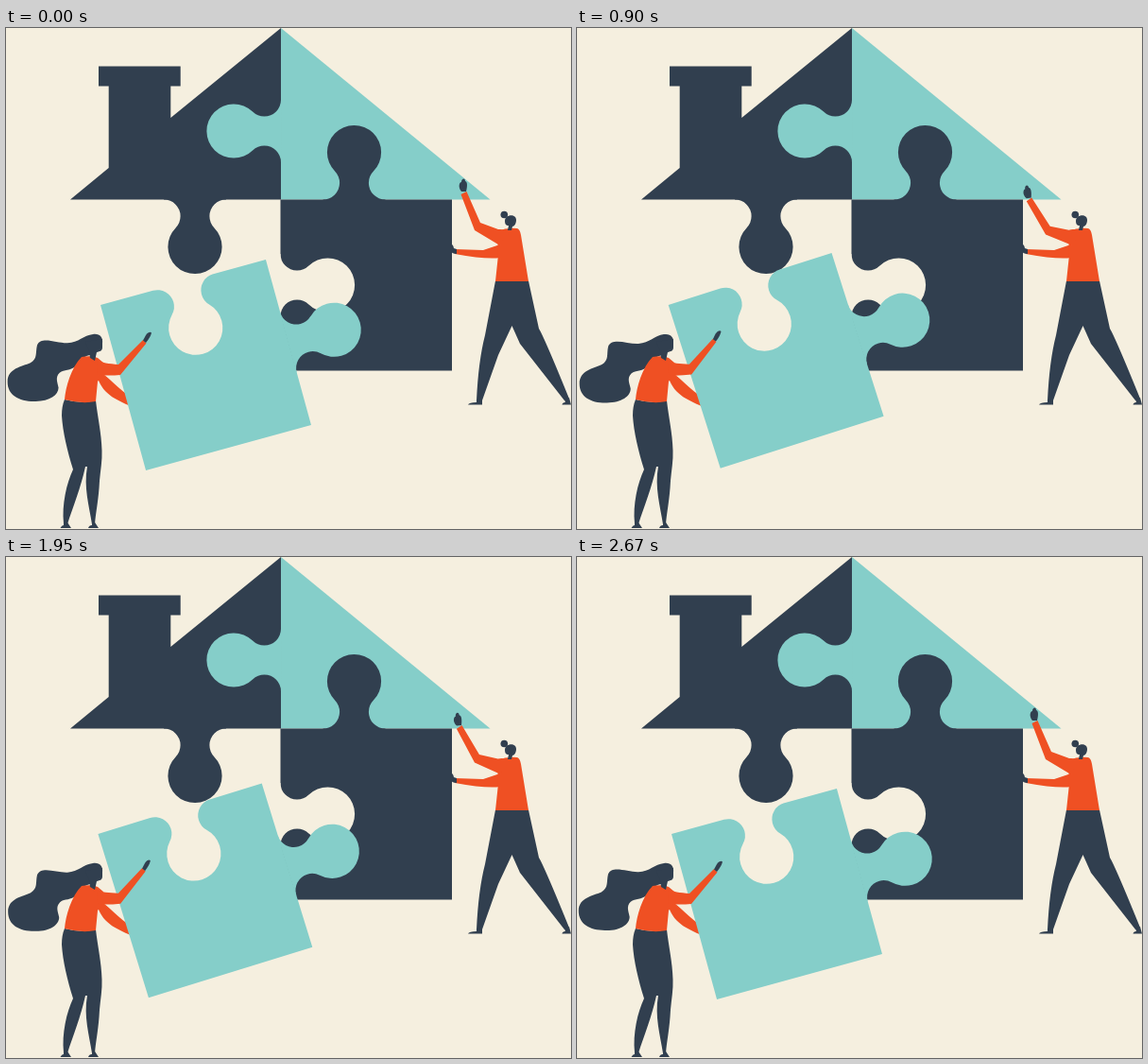
An HTML page with a canvas that plays this animation: 598 px wide and 530 px high, repeating every 2700 ms.

```html
<!DOCTYPE html>
<html lang="en">
<head>
<meta charset="utf-8">
<title>Puzzle house</title>
<style>
html, body { margin: 0; width: 100%; height: 100%; overflow: hidden; background: #f5efdf; }
canvas { display: block; }
</style>
</head>
<body>
<canvas id="stage" width="598" height="530"></canvas>
<script>
const ctx = document.getElementById('stage').getContext('2d');
const CREAM = '#f5efdf', NAVY = '#313f4f', TEAL = '#85cec9', ORANGE = '#ef5023';
const LOOP = 2700, STEP = 30, TAU = Math.PI * 2;

// Jigsaw tab sitting on the local x axis and pointing towards +y.
const KNOB = 50, KNOB_R = 28.6, NECK_X = 33, NECK_R = 17.6;

function addTab(path, base) {
  const a = Math.atan2(KNOB - NECK_R, NECK_X);
  path.moveTo(-NECK_X, base);
  path.lineTo(-NECK_X, 0);
  path.arc(-NECK_X, NECK_R, NECK_R, -Math.PI / 2, a);
  path.arc(0, KNOB, KNOB_R, Math.PI + a, -a, true);
  path.arc(NECK_X, NECK_R, NECK_R, Math.PI - a, Math.PI * 1.5);
  path.lineTo(NECK_X, base);
  return path;
}

// The base reaches slightly into the neighbouring shape to hide the seam.
const tabPath = addTab(new Path2D(), -0.6);

function tab(x, y, turn, color) {
  ctx.save();
  ctx.translate(x, y);
  ctx.rotate(turn * Math.PI / 2);
  ctx.fillStyle = color;
  ctx.fill(tabPath);
  ctx.restore();
}

function fill(path, color) {
  ctx.fillStyle = color;
  ctx.fill(path);
}

function dot(x, y, r, color) {
  ctx.beginPath();
  ctx.arc(x, y, r, 0, TAU);
  ctx.fillStyle = color;
  ctx.fill();
}

function rotated(x, y, angle, draw) {
  ctx.save();
  ctx.translate(x, y);
  ctx.rotate(angle);
  ctx.translate(-x, -y);
  draw();
  ctx.restore();
}

const house = {
  left: new Path2D('M291 0 174.3 95V61.5H184.7V40.5H98V61.5H108.7V148L68 181.5H291Z'),
  right: new Path2D('M291 0 512.5 181.5H291Z'),
  wall: new Path2D('M290.5 181.5H472V362.5H290.5Z')
};

const woman = {
  hair: new Path2D('M102 334C103 327 99 323 92 324C82 325 77 333 65 333.5C54 334 37 326 33 336C31 344 34 350 26 355C17 359 2 361 2 375C2 389 14 395.5 30 395.5C46 396 56 389 56 381C55 375 52 370 57 365C62 361 68 364 75 357C79 353 80 348 89 346Z'),
  face: new Path2D('M84 332L102 329V338C102 342 99 342 96 343L94 352L89 349L88 342Z'),
  torso: new Path2D('M80 348C86 347 92 347 97 349L103 354L102 367L97 374L95 395Q80 398 62 393C63 380 69 359 80 348Z'),
  backArm: new Path2D('M97 362C108 368 117 381 136 393L136 402C119 394 103 389 97 370Z'),
  frontArm: new Path2D('M96 350C101 355 109 355 119 356L145 330 148.5 333.5 121 367Q109 368 97 367Z'),
  hand: new Path2D('M145 330.5L148 325C150 322 153 321 154 322.5Q153 327 148 333Z'),
  legs: new Path2D('M62 393Q80 398 95 394C97 412 101 428 101.5 447C102 457 100 468 99 479C98 500 95 512 94 525H91C88 505 82 486 86 464H84C79 487 71 506 65 525L61 524C59 504 64 482 71 467C65 448 60 427 59 410Q59 400 62 393Z'),
  feet: new Path2D('M61 523H65L69 529H57.5Q59 526 61 526ZM91 523H94L98 529H87Q88 526 91 526Z')
};

const man = {
  head: new Path2D('M528 204C528 197 540 196 540 203C540 207 538 210 536 210L535 214H531L532 209C529 209 528 207 528 204Z'),
  torso: new Path2D('M520 215Q530 211 541 212Q544 213 545 219L553 268H518L521 240Z'),
  lowArm: new Path2D('M475 234L505 235 523 229V243Q508 245 475 239Z'),
  lowHand: new Path2D('M470 229Q473 228 474 233L477 234V239Q471 239 471 235Z'),
  highArm: new Path2D('M481.5 176L487.5 173 502 206 521 213Q531 212 532 220L521 229 496 214Z'),
  highHand: new Path2D('M482 173C478 168 480 163 482 163C482 159 486 158 486 162C489 163 488 169 487 173Z'),
  legs: new Path2D('M518 267.5H553L564 318Q570 328 596 392L591 394 544 334 535.5 315 521 346 504 394H498Q500 352 507 325Z'),
  feet: new Path2D('M498 393H504V398.5H489Q490 396 498 396ZM591 393L596 391 598 398.5H588.5Q589 396 592 396Z')
};

// The socket is cut out, so whatever lies behind the piece stays visible.
const HALF = 90.7;
const piece = new Path2D();
piece.rect(-HALF, -HALF, HALF * 2, HALF * 2);
piece.addPath(addTab(new Path2D(), 0), new DOMMatrix().translate(0, -HALF));

function drawHouse() {
  fill(house.left, NAVY);
  fill(house.right, TEAL);
  fill(house.wall, NAVY);
  tab(291, 109, 1, TEAL);
  tab(368.5, 181.5, 2, NAVY);
  tab(200, 181.5, 0, NAVY);
  tab(290.5, 272, -1, CREAM);
}

function drawPiece(swing) {
  rotated(97, 375.5, swing, () => {
    ctx.translate(211.5, 356.5);
    ctx.rotate(-15.35 * Math.PI / 180);
    ctx.fillStyle = TEAL;
    ctx.fill(piece, 'evenodd');
    tab(HALF, 0, -1, TEAL);
  });
}

function drawWoman(push, wave) {
  fill(woman.legs, NAVY);
  fill(woman.feet, NAVY);
  rotated(98, 334, wave, () => fill(woman.hair, NAVY));
  fill(woman.torso, ORANGE);
  fill(woman.face, NAVY);
  rotated(110, 361, push, () => {
    fill(woman.frontArm, ORANGE);
    fill(woman.hand, NAVY);
  });
}

function drawMan(reach) {
  fill(man.legs, NAVY);
  fill(man.feet, NAVY);
  fill(man.lowArm, ORANGE);
  fill(man.lowHand, NAVY);
  fill(man.torso, ORANGE);
  rotated(525, 216, reach, () => {
    fill(man.highArm, ORANGE);
    fill(man.highHand, NAVY);
  });
  fill(man.head, NAVY);
  dot(527.3, 197.5, 3.8, NAVY);
}

function render(time) {
  const t = Math.floor(time % LOOP / STEP) * STEP;
  const lift = (1 - Math.cos(TAU * t / LOOP)) / 2;
  const wave = 0.015 * Math.cos(TAU * (t - 200) / (LOOP / 2));

  ctx.fillStyle = CREAM;
  ctx.fillRect(0, 0, 598, 530);
  drawHouse();
  fill(woman.backArm, ORANGE);
  drawPiece(-0.054 * lift);
  drawWoman(-0.05 * lift, wave);
  drawMan(-0.21 * lift);
}

const start = performance.now();
function tick() {
  render(performance.now() - start);
  requestAnimationFrame(tick);
}
tick();
</script>
</body>
</html>
```
